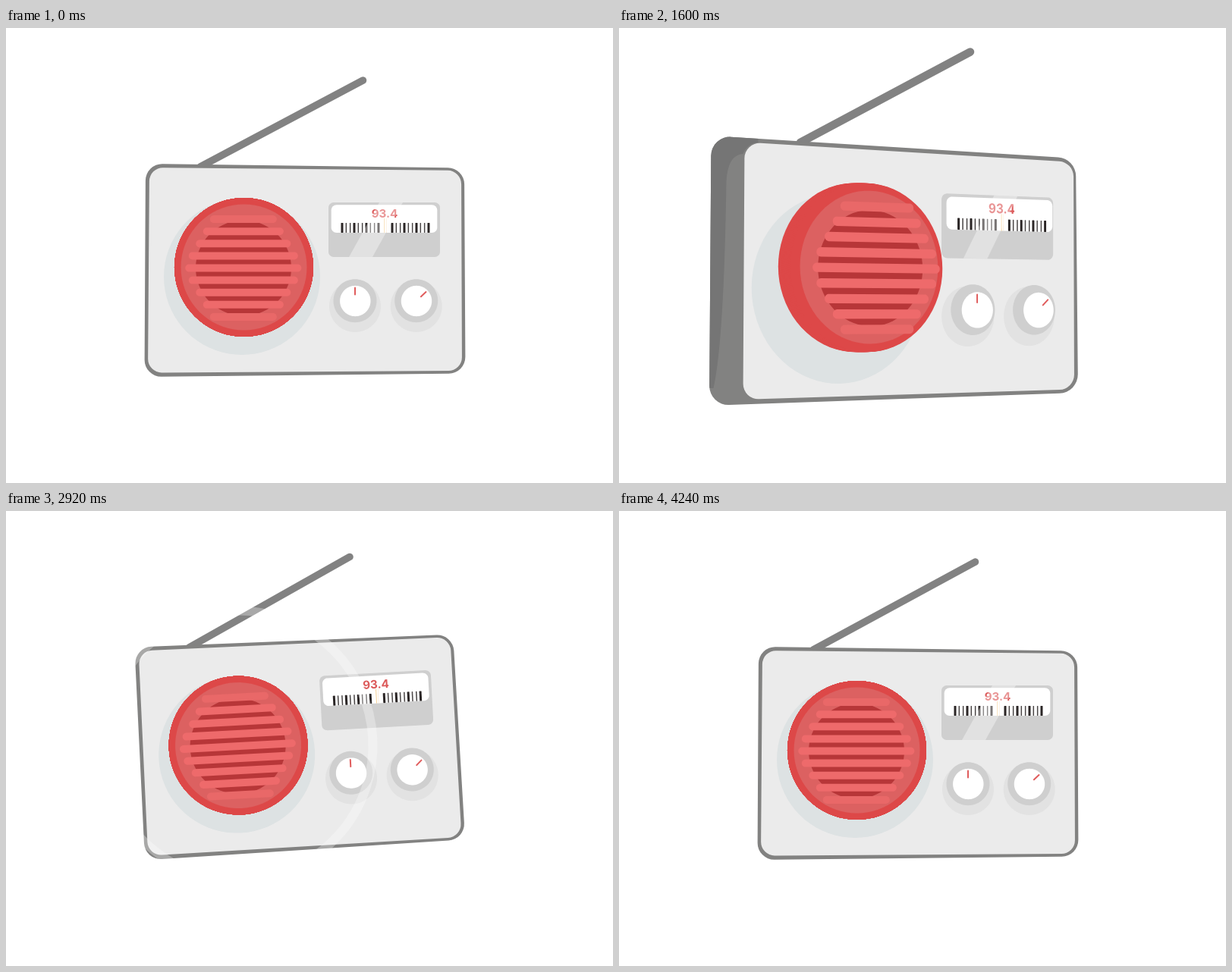
Animation, 800 px wide and 600 px high, one loop 4.28 s. Source, as an HTML page with a canvas:

```html
<!DOCTYPE html>
<html lang="en">
<head>
<meta charset="utf-8">
<title>Radio</title>
<style>
  html, body { margin: 0; width: 100%; height: 100%; overflow: hidden; background: #fff; }
  canvas { display: block; width: 800px; height: 600px; }
</style>
</head>
<body>
<canvas id="stage" width="800" height="600"></canvas>
<script>
const ctx = document.getElementById('stage').getContext('2d');
const LOOP = 4280, STEP = 40, MID = 0.74;

// Each part at rest, at MID of the turn, and fully turned: x, y pairs.
const SHELL = [
  [184, 179, 604, 184.5, 605.5, 455.5, 182.5, 460],
  [137.5, 153, 613, 173, 615, 475, 136, 488],
  [121.5, 142, 602, 172, 605, 481, 119, 498]];
const FACE = [
  [189, 184, 600, 188, 601, 452, 187, 454.5],
  [163.5, 160.5, 609, 177.5, 610, 471, 162, 481],
  [165.5, 150.5, 599, 177, 600, 476.5, 163.5, 490]];
const ANTENNA = [
  [256, 183, 470.5, 69],
  [240, 160.5, 469.5, 39.5],
  [239, 151, 463, 31.5]];

// Rocking: [time, value]
const ROLL = [[2800, 0], [3120, -10], [3300, 4], [3455, -7], [3655, 4],
  [3800, -1.5], [3960, 0.8], [4100, -0.3], [4240, 0]];
const HOP = [[2800, 0], [2920, -11], [3100, -12.5], [3440, -8], [3560, -5], [3920, 0]];
const WHIP = [[2800, 0], [2920, 1.65], [3120, 0], [3300, -2], [3560, 3],
  [3800, -3], [4000, -1.2], [4240, -0.5], [4280, 0]];
const GLARE = [[2800, 1], [2900, 0], [3200, 0], [3400, 1]];

const clamp = x => Math.max(0, Math.min(1, x));
const lerp = (a, b, k) => a + (b - a) * k;
const smooth = x => x * x * (3 - 2 * x);
const cubic = x => x < 0.5 ? 4 * x ** 3 : 1 - 4 * (1 - x) ** 3;
const rad = deg => deg * Math.PI / 180;

function track(keys, t) {
  if (t <= keys[0][0]) return keys[0][1];
  for (let i = 1; i < keys.length; i++) {
    const [t0, a] = keys[i - 1], [t1, b] = keys[i];
    if (t <= t1) return lerp(a, b, (1 - Math.cos(Math.PI * (t - t0) / (t1 - t0))) / 2);
  }
  return keys[keys.length - 1][1];
}

const turnAt = t => t < 1600 ? cubic(clamp((t - 270) / 630)) : 1 - smooth(clamp((t - 1600) / 1020));

// Quadratic through the three poses
function pose([a, b, c], s) {
  return a.map((v, i) => {
    const k = (b[i] - lerp(v, c[i], MID)) / (MID * (1 - MID));
    return lerp(v, c[i], s) + k * s * (1 - s);
  });
}

// 3x3 matrix taking the unit square to a quad
function squareToQuad([x0, y0, x1, y1, x2, y2, x3, y3]) {
  const sx = x0 - x1 + x2 - x3, sy = y0 - y1 + y2 - y3;
  const ax = x1 - x2, ay = y1 - y2, bx = x3 - x2, by = y3 - y2;
  const det = ax * by - bx * ay;
  const g = (sx * by - bx * sy) / det, h = (ax * sy - sx * ay) / det;
  return [x1 - x0 + g * x1, x3 - x0 + h * x3, x0,
          y1 - y0 + g * y1, y3 - y0 + h * y3, y0, g, h, 1];
}

const adjugate = ([a, b, c, d, e, f, g, h, i]) => [
  e * i - f * h, c * h - b * i, b * f - c * e,
  f * g - d * i, a * i - c * g, c * d - a * f,
  d * h - e * g, b * g - a * h, a * e - b * d];

const multiply = (m, n) => m.map((_, i) => {
  const r = i - i % 3, c = i % 3;
  return m[r] * n[c] + m[r + 1] * n[c + 3] + m[r + 2] * n[c + 6];
});

const restInverse = adjugate(squareToQuad(FACE[0]));
let view, depth;

function project(x, y, dx = 0, dy = 0) {
  const w = view[6] * x + view[7] * y + view[8];
  return [(view[0] * x + view[1] * y + view[2]) / w + dx * depth,
          (view[3] * x + view[4] * y + view[5]) / w + dy * depth];
}

function fill(points, color, dx, dy) {
  ctx.beginPath();
  for (const [x, y] of points) ctx.lineTo(...project(x, y, dx, dy));
  ctx.closePath();
  ctx.fillStyle = color;
  ctx.fill();
}

function arc(cx, cy, r, from, to, n) {
  return Array.from({ length: n + 1 }, (_, i) => {
    const a = lerp(from, to, i / n);
    return [cx + r * Math.cos(a), cy + r * Math.sin(a)];
  });
}

const disc = (cx, cy, r, color, dx, dy) => fill(arc(cx, cy, r, 0, 2 * Math.PI, 72), color, dx, dy);

function box(x0, y0, x1, y1, r, color, dx, dy) {
  const q = Math.PI / 2;
  fill([
    ...arc(x0 + r, y0 + r, r, 2 * q, 3 * q, 8), ...arc(x1 - r, y0 + r, r, 3 * q, 4 * q, 8),
    ...arc(x1 - r, y1 - r, r, 0, q, 8), ...arc(x0 + r, y1 - r, r, q, 2 * q, 8)
  ], color, dx, dy);
}

function stroke(points, width, color, dx, dy) {
  ctx.beginPath();
  for (const [x, y] of points) ctx.lineTo(...project(x, y, dx, dy));
  ctx.lineWidth = width;
  ctx.lineCap = 'round';
  ctx.strokeStyle = color;
  ctx.stroke();
}

function roundQuad(q, r) {
  ctx.beginPath();
  ctx.moveTo((q[0] + q[2]) / 2, (q[1] + q[3]) / 2);
  for (let i = 2; i < 10; i += 2) {
    ctx.arcTo(q[i % 8], q[i % 8 + 1], q[(i + 2) % 8], q[(i + 2) % 8 + 1], r);
  }
  ctx.closePath();
}

function drawAntenna(s, t) {
  const [x0, y0, x1, y1] = pose(ANTENNA, s);
  ctx.save();
  ctx.translate(x0, y0);
  ctx.rotate(rad(track(WHIP, t)));
  ctx.beginPath();
  ctx.moveTo(0, 0);
  ctx.lineTo(x1 - x0, y1 - y0);
  ctx.lineWidth = 9.5 + s;
  ctx.lineCap = 'round';
  ctx.strokeStyle = '#828282';
  ctx.stroke();
  ctx.restore();
}

function drawShell(s) {
  const q = pose(SHELL, s);
  roundQuad(q, 22 + 3 * s);
  ctx.fillStyle = '#828281';
  ctx.fill();
  const k = clamp((s - 0.55) / 0.45);
  if (!k) return;
  // Darker rim of the side
  ctx.save();
  ctx.clip();
  ctx.translate(q[0], q[1]);
  ctx.beginPath();
  ctx.moveTo(-4, -4);
  ctx.lineTo(62, -4);
  ctx.lineTo(62, 9 * k);
  ctx.quadraticCurveTo(48, 10 * k, lerp(32, 42, k), lerp(10, 24, k));
  ctx.quadraticCurveTo(lerp(14, 22, k), lerp(18, 25, k), lerp(4, 20, k), lerp(24, 60, k));
  ctx.quadraticCurveTo(lerp(0, 17, k), lerp(30, 270, k), lerp(-4, 3, k), lerp(34, 333, k));
  ctx.lineTo(-4, lerp(34, 333, k));
  ctx.fillStyle = '#757575';
  ctx.fill();
  ctx.restore();
}

function drawSpeaker() {
  for (let i = 0; i <= 14; i++) disc(313.5, 315.5, 91.5, '#dd4848', lerp(6, 22, i / 14), -1.5);
  disc(313.5, 315.5, 83, '#dc6161', 25, -2);
  disc(313, 316.5, 63, '#b73638', 26.5, -2);
  const halves = [76.5, 72, 62.5, 53, 44];
  for (let i = -4; i <= 4; i++) {
    const y = 316.5 + i * 16.1 * (1 + 0.03 * depth), w = halves[Math.abs(i)];
    box(312.8 - w, y - 5, 312.8 + w, y + 5, 5, Math.abs(i) === 4 ? '#e96868' : '#ee6a6b', 35, -2);
  }
}

function drawText(text, x, y, dx) {
  const o = project(x, y, dx), a = project(x + 1, y, dx), b = project(x, y + 1, dx);
  ctx.save();
  ctx.transform(a[0] - o[0], a[1] - o[1], b[0] - o[0], b[1] - o[1], o[0], o[1]);
  ctx.font = '700 15.2px Inter, "Liberation Sans", sans-serif';
  ctx.textAlign = 'center';
  ctx.fillStyle = '#dc5a5a';
  ctx.fillText(text, 0, 0);
  ctx.restore();
}

function drawTuner(t) {
  box(425, 230, 572, 302, 7, '#cfcfcf');
  box(428.7, 233.3, 568.3, 270, 7, '#fff', 2.7);
  drawText('93.4', 499, 250.3, 4);
  for (const start of [443, 509]) {
    for (let i = 0; i < 10; i++) {
      const x = start + i * 5.33, w = i % 3 ? 0.75 : 1.5;
      box(x - w, 257, x + w, 270, 0.6, i % 3 ? '#4a4646' : '#2b2626', 4);
    }
  }
  box(498.2, 251, 499.2, 270, 0, '#f5cf94', 4);
  box(501, 251, 501.8, 270, 0, '#fbe6cf', 4);
  ctx.globalAlpha = 0.36 * track(GLARE, t);
  fill([[452, 302], [483, 302], [523, 230], [492, 230]], '#fff', 1);
  ctx.globalAlpha = 1;
}

function drawKnob(x, angle) {
  disc(x, 367, 34, '#e2e2e2', -1);
  disc(x, 359.7, 28.5, '#cfcfcf', 5.5);
  disc(x + 0.3, 360, 20.2, '#fff', 11);
  const sin = Math.sin(rad(angle)), cos = Math.cos(rad(angle));
  const at = r => [x + r * sin, 360 - r * cos];
  stroke([at(8.5), at(17.5)], 2, '#e05c5c', 11);
}

// Sound ring spreading from the speaker
function drawWave(t) {
  const k = (t - 2800) / 320;
  if (k <= 0 || k >= 1) return;
  ctx.globalAlpha = 0.48 * (1 - k);
  ctx.beginPath();
  ctx.arc(313.5, 315.5, 80 + 260 * k, 0, 2 * Math.PI);
  ctx.lineWidth = 12;
  ctx.strokeStyle = '#fff';
  ctx.stroke();
  ctx.globalAlpha = 1;
}

function draw(t) {
  const s = turnAt(t), face = pose(FACE, s);
  view = multiply(squareToQuad(face), restInverse);
  depth = s ** 1.7;

  ctx.fillStyle = '#fff';
  ctx.fillRect(0, 0, 800, 600);
  ctx.save();
  ctx.translate(394, 456 + track(HOP, t));
  ctx.rotate(rad(track(ROLL, t)));
  ctx.translate(-394, -456);

  drawAntenna(s, t);
  drawShell(s);
  roundQuad(face, 18 + 2 * s);
  ctx.fillStyle = '#ebebeb';
  ctx.fill();
  disc(311, 328, 103, '#dde2e3', -13, 11);
  drawTuner(t);
  drawKnob(460, 0);
  drawKnob(540.7, 47);
  drawWave(t);
  drawSpeaker();
  ctx.restore();
}

const began = performance.now();
function tick() {
  const t = (performance.now() - began) % LOOP;
  draw(Math.floor(t / STEP) * STEP);
  requestAnimationFrame(tick);
}
tick();
</script>
</body>
</html>
```
